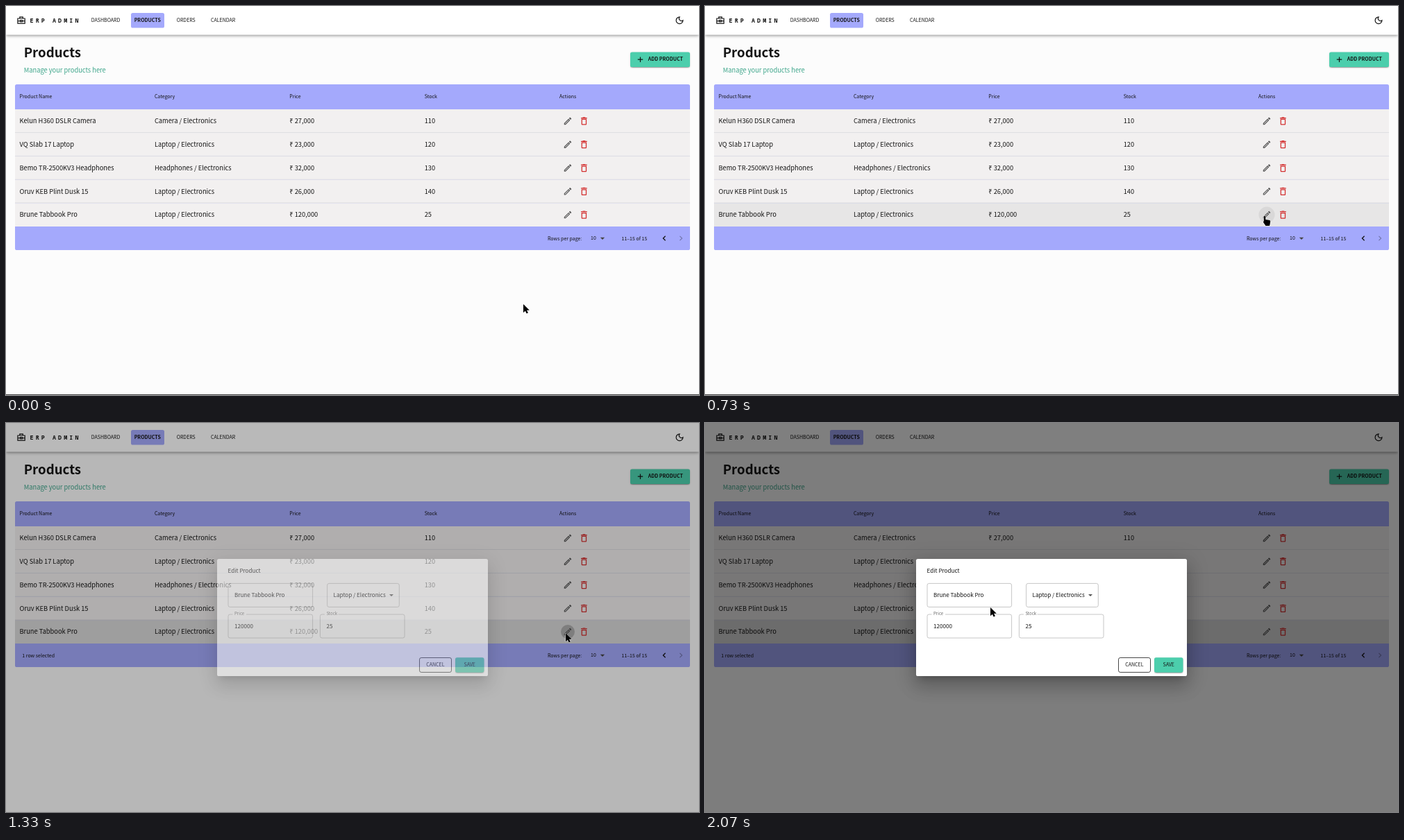
Write an HTML page that moves like this. It is 998 px wide and 561 px high and loops after 2140 ms.

```html
<!DOCTYPE html>
<html lang="en">
<head>
<meta charset="utf-8">
<title>Products</title>
<style>
  html, body { margin: 0; width: 100%; height: 100%; overflow: hidden; background: #fcfcfc; }
  svg { display: block; width: 100%; height: 100%; }
  text { font-family: "Noto Sans CJK SC", "Noto Sans CJK JP", "Noto Sans", sans-serif; fill: #141414; white-space: pre; }
  .mono { font-family: "Noto Sans Mono", monospace; letter-spacing: 3.12px; }
  .line { fill: none; stroke: #141414; }
</style>
</head>
<body>
<svg id="stage" viewBox="0 0 998 561"></svg>
<script>
const LILAC = '#a4a9fc', GREEN = '#4cceac';
const TITLE = 18.65, BODY = 9.31, FORM = 8.1, SMALL = 7, LABEL = 6.1;

const rect = (x, y, w, h, fill, more = '') =>
  `<rect x="${x}" y="${y}" width="${w}" height="${h}" fill="${fill}" ${more}/>`;
const text = (x, y, size, content, more = '') =>
  `<text x="${x}" y="${y}" font-size="${size}" ${more}>${content}</text>`;
const line = (d, width = 1, more = '') =>
  `<path class="line" d="${d}" stroke-width="${width}" ${more}/>`;
const icon = (cx, cy, size, d, fill) =>
  `<path transform="translate(${cx - size / 2} ${cy - size / 2}) scale(${size / 24})" d="${d}" fill="${fill}"/>`;
const bold = 'font-weight="700"';
const round = 'rx="2.6"';

// Each layer is [offset, blur, spread, alpha] as in a CSS box shadow.
const shadow = (x, y, w, h, layers) => layers.map(([dy, blur, spread, alpha]) =>
  rect(x - spread, y + dy - spread, w + 2 * spread, h + 2 * spread, '#000',
    `${round} opacity="${alpha}" style="filter:blur(${blur / 2}px)"`)).join('');
const LOW = [[2, 0.7, -1.3, .2], [1.3, 1.3, 0, .14], [.65, 3.2, 0, .12]];
const BAR = [[1.3, 2.6, -.65, .2], [2.6, 3.2, 0, .14], [.65, 6.5, 0, .12]];
const HIGH = [[7.1, 9.8, -4.5, .2], [15.6, 24.7, 2, .14], [5.9, 30, 5.2, .12]];

const PENCIL = 'M14.06 9.02l.92.92L5.92 19H5v-.92l9.06-9.06M17.66 3c-.25 0-.51.1-.7.29l-1.83 1.83 3.75 3.75 1.83-1.83c.39-.39.39-1.02 0-1.41l-2.34-2.34c-.2-.2-.45-.29-.71-.29zm-3.6 3.19L3 17.25V21h3.75L17.81 9.94z';
const BIN = 'M6 19c0 1.1.9 2 2 2h8c1.1 0 2-.9 2-2V7H6zM8 9h8v10H8zm7.5-5l-1-1h-5l-1 1H5v2h14V4z';

const products = [
  ['Kelun H360 DSLR Camera', 'Camera / Electronics', '₹ 27,000', '110'],
  ['VQ Slab 17 Laptop', 'Laptop / Electronics', '₹ 23,000', '120'],
  ['Bemo TR-2500KV3 Headphones', 'Headphones / Electronics', '₹ 32,000', '130'],
  ['Oruv KEB Plint Dusk 15', 'Laptop / Electronics', '₹ 26,000', '140'],
  ['Brune Tabbook Pro', 'Laptop / Electronics', '₹ 120,000', '25'],
];
const ROW = 33.8;
const columnX = i => 19.5 + 194.4 * i;

const navBar = () =>
  shadow(0, 0, 998, 41.6, BAR) + rect(0, 0, 998, 41.6, '#fff') +
  line('M16.9 18h10.3v7.2H16.9zM19.8 18v-2.2h4.5V18M17 21.6h3.6m2.9 0h3.6M20.7 20.6h2.7v2h-2.7z', 1.2) +
  text(34.6, 23.5, 8.3, 'ERP ADMIN', `class="mono" ${bold}`) +
  rect(180, 10, 48, 21.5, LILAC, round) +
  text(122.8, 22.9, SMALL, 'DASHBOARD') +
  text(184.7, 22.9, SMALL, 'PRODUCTS', bold) +
  text(245.7, 22.9, SMALL, 'ORDERS') +
  text(295, 22.9, SMALL, 'CALENDAR') +
  line('M970 15.8a4.9 4.9 0 1 0 4.9 4.9a3.5 3.5 0 0 1-4.9-4.9z', 1.2);

const heading = () =>
  text(25.7, 73.6, TITLE, 'Products', bold) +
  text(25.7, 96.2, BODY, 'Manage your products here', 'style="fill:#3da58a"') +
  shadow(899, 66.5, 86, 21.5, LOW) + rect(899, 66.5, 86, 21.5, GREEN, round) +
  line('M909.8 77.2h7.4M913.5 73.5v7.4', 1.2) +
  text(924.8, 79.3, SMALL, 'ADD PRODUCT', bold);

const tableRow = (cells, i) => {
  const y = 149 + ROW * i, middle = y + 16.9;
  return rect(13, y, 972, ROW, '#f2f0f0', i === 4 ? 'id="lastRow"' : '') +
    (i ? rect(13, y - .7, 972, .7, '#dcdcdc') : '') +
    cells.map((cell, c) => text(columnX(c), y + 20.2, BODY, cell)).join('') +
    (i === 4 ? `<circle id="halo" cx="809" cy="${middle}"/>` : '') +
    icon(809, middle, 14, PENCIL, '#555') + icon(832.4, middle, 15, BIN, '#d32f2f');
};

const table = () =>
  rect(13, 113, 972, 239, LILAC, round) +
  ['Product Name', 'Category', 'Price', 'Stock', 'Actions']
    .map((name, i) => text(columnX(i), 133.1, SMALL, name)).join('') +
  products.map(tableRow).join('') +
  text(23.3, 337.5, SMALL, '1 row selected', 'id="selection"') +
  text(780, 337.5, SMALL, 'Rows per page:') + text(842, 337.3, SMALL, '10') +
  '<path d="M855.8 333.7h6.4l-3.2 3.2z" fill="#444"/>' +
  text(886.6, 337.5, SMALL, '11–15 of 15') +
  line('M949.6 331.8l-3.2 3.2 3.2 3.2', 1.3) +
  line('M970.4 331.8l3.2 3.2-3.2 3.2', 1.1, 'opacity=".35"');

const field = (x, y, w, value, label, id = '') =>
  rect(x, y, w, 34, 'none', `${round} stroke="#b8b8b8" stroke-width=".8" ${id}`) +
  (label ? rect(x + 6.5, y - 1, label.length * 3 + 4.5, 2, '#fff') +
    text(x + 9, y + 1.2, LABEL, label, 'opacity=".65"') : '') +
  text(x + 9, y + 19.9, FORM, value);

const dialog = () =>
  shadow(304, 196, 390, 169, HIGH) + rect(304, 196, 390, 169, '#fff', round) +
  text(319.6, 216.1, FORM, 'Edit Product') +
  field(320, 231.4, 121.6, products[4][0]) +
  field(462.6, 231.4, 103.7, products[4][1]) +
  '<path d="M552 247h6l-3 3z" fill="#555"/>' +
  field(320, 276, 121.6, '120000', 'Price') +
  field(452.4, 276, 121.6, '25', 'Stock', 'id="stockField"') +
  rect(595.5, 338.5, 46, 21, 'none', `${round} stroke="#333" stroke-width=".9"`) +
  text(605.3, 351.4, SMALL, 'CANCEL') +
  shadow(647, 338.3, 41.5, 21.4, LOW) + rect(647, 338.3, 41.5, 21.4, GREEN, round) +
  text(659.5, 351.4, SMALL, 'SAVE');

const pointers = {
  arrow: 'M0 0V12.2L2.8 9.7 4.7 13.5 6.9 12.4 5 8.8H8.8z',
  hand: 'M0 0c.9 0 1.3.7 1.3 1.5V5l5 .8c1.4.2 2 1 1.9 2.3L7.6 11.5 7 14H1.5L-1.6 9.5C-2.4 8-1.8 7.4-1.2 7.4V1.5C-1.2.7-.8 0 0 0z',
  beam: 'M-2-5.5h4v.9H.5v9.2H2v.9h-4v-.9h1.5v-9.2H-2z',
};

document.getElementById('stage').innerHTML =
  rect(0, 0, 998, 561, '#fcfcfc') + heading() + table() + navBar() +
  rect(0, 560, 998, 1, '#444', 'id="edge"') +
  rect(0, 0, 998, 561, '#000', 'id="backdrop"') +
  `<g id="dialog">${dialog()}</g>` +
  '<path id="pointer" stroke="#fff" stroke-width=".9" paint-order="stroke"/>';

const part = Object.fromEntries(
  [...document.querySelectorAll('[id]')].map(node => [node.id, node]));
const set = (name, values) => {
  for (const key in values) part[name].setAttribute(key, values[key]);
};

const LOOP = 2140, STEP = 1000 / 15;
// Pointer stops: step, x, y, shape.
const stops = [
  [0, 745, 430, 'arrow'], [2, 756, 411, 'arrow'], [3, 788, 345, 'arrow'],
  [4, 810.5, 295, 'hand'], [5, 822, 293, 'hand'], [6, 827, 293, 'hand'],
  [7, 821, 296, 'hand'], [8, 813, 300, 'hand'], [9, 808, 304, 'hand'],
  [10, 807, 303.5, 'hand'], [11, 806, 303, 'hand'], [19, 806, 303, 'arrow'],
  [25, 740, 299, 'arrow'], [26, 612, 294, 'arrow'], [27, 520, 292, 'beam'],
  [30, 446, 275, 'arrow'], [31, 411, 266, 'arrow'],
];
const fadeSteps = [.05, .55, .93];

function draw(time) {
  const step = Math.floor((time % LOOP + 3.4) / STEP);
  const fade = step < 19 ? 0 : fadeSteps[step - 19] ?? 1;
  const [, x, y, shape] = stops.findLast(stop => stop[0] <= step);
  const selected = step >= 17, pressed = step >= 15;

  set('pointer', { d: pointers[shape], transform: `translate(${x} ${y})` });
  set('lastRow', { fill: selected ? '#dad9d9' : step >= 4 ? '#e7e6e6' : '#f2f0f0' });
  set('halo', {
    r: pressed ? Math.min(10, 5 + (step - 15) * 1.2) : 11.6,
    opacity: step < 8 || step >= 25 ? 0 : pressed ? .2 : .06,
  });
  set('selection', { opacity: +selected });
  set('edge', { opacity: step < 19 ? 1 : 0 });
  set('backdrop', { opacity: fade / 2 });
  set('dialog', { opacity: fade });
  set('stockField', { stroke: shape === 'beam' ? '#222' : '#b8b8b8' });
}

const start = performance.now();
function tick() {
  draw(performance.now() - start);
  requestAnimationFrame(tick);
}
tick();
</script>
</body>
</html>
```
